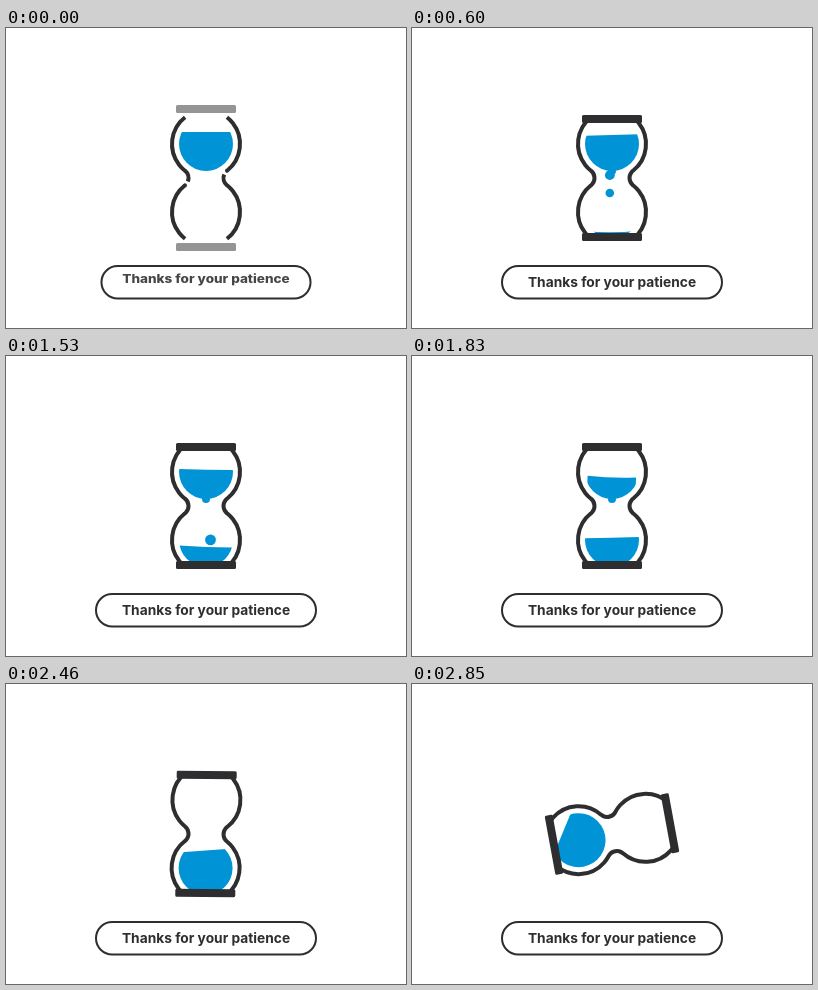
An HTML page with a canvas for the animation above (2.88 s loop, 400 by 300 pixels).

```html
<!DOCTYPE html>
<html lang="en">
<head>
<meta charset="utf-8">
<title>Hourglass</title>
<style>
html, body { margin: 0; width: 100%; height: 100%; overflow: hidden; background: #fff; }
canvas { display: block; width: 400px; height: 300px; }
</style>
</head>
<body>
<canvas id="stage"></canvas>
<script>
const LOOP = 2880, DARK = '#2e2d2f', BLUE = '#0094d6', RAD = Math.PI / 180;
const DROP_TIMES = [368, 500, 798, 1214, 1878];
const canvas = document.getElementById('stage');
const ctx = canvas.getContext('2d');
const dpr = window.devicePixelRatio || 1;
canvas.width = 400 * dpr;
canvas.height = 300 * dpr;

const { sin, cos, PI } = Math;
const clamp = x => Math.max(0, Math.min(1, x));
const mix = (a, b, k) => a + (b - a) * k;

function disc(x, y, r) {
  ctx.beginPath();
  ctx.arc(x, y, r, 0, 7);
  ctx.fill();
}

// Fills a bulb below a tilted, slightly sagging surface; level is relative to its centre.
function liquid(y, level, tilt, dip, w = 30) {
  if (level > 27) return;
  ctx.save();
  ctx.translate(0, y);
  ctx.beginPath();
  ctx.arc(0, 0, 27, 0, 7);
  ctx.clip();
  ctx.rotate(tilt * RAD);
  ctx.beginPath();
  ctx.moveTo(-w, level - dip);
  ctx.quadraticCurveTo(0, level + dip, w, level - dip);
  ctx.lineTo(w, 40);
  ctx.lineTo(-w, 40);
  ctx.fill();
  ctx.restore();
}

// The top bulb drains slowly, then in a rush.
function topLiquid(t) {
  const p = clamp(t / 2200), rush = p ** 8;
  const tilt = -4 * (1 - p ** 4) * sin(PI * Math.max(0, t - 470) / 950);
  liquid(-34, -12 + 11 * p + 36 * rush, tilt, 4 * rush, 30 - 25 * rush);
}

function lowLiquid(t, turn) {
  const p = Math.min(1, (t - 300) / 1800);
  const slosh = turn + Math.max(0, turn - 12) * 0.94;
  const tilt = 4 * p * sin(2.5 * PI * (p - 0.4)) - slosh;
  liquid(34, 24 - 22 * p - 19.5 * p ** 6, tilt, 2 * (1 - p));
}

function drip(t) {
  if (t > 200 && t < 2000) disc(0, -7, 4 * clamp((t - 200) / 150));
  DROP_TIMES.forEach((birth, i) => {
    const age = t - birth, y = -7 + 65 * (age / 400) ** 2;
    if (age < 0 || y > 54) return;
    const x = 4.5 * cos(1.4 * (i - 3)), r = 6.5 - 1.1 * Math.abs(i - 2);
    disc(x * clamp(age / 200), y, r * clamp(0.5 + age / 250));
  });
}

// One wall of the glass; the other is the same turned by half a circle.
function wall(gap) {
  ctx.beginPath();
  ctx.arc(0, -34, 34, 232 * RAD, 128.2 * RAD, true);
  ctx.arc(-26.8, 0, 9.3, -51.8 * RAD, 51.8 * RAD);
  ctx.arc(0, 34, 34, -128.2 * RAD, -232 * RAD, true);
  ctx.setLineDash(gap > 0.05 ? [75.3 - gap, 2 * gap, 200] : []);
  ctx.stroke();
}

function glass(t, k) {
  const turn = 79 * Math.max(0, (t - 2290) / 560) ** 4;
  ctx.save();
  ctx.translate(200, 150);
  ctx.rotate(turn * RAD);

  ctx.fillStyle = BLUE;
  topLiquid(t);
  lowLiquid(t, turn);
  drip(t);

  ctx.strokeStyle = ctx.fillStyle = DARK;
  ctx.lineWidth = 4;
  ctx.lineJoin = 'round';
  for (let side = 0; side < 2; side++) {
    wall(2 * (1 - k));
    ctx.globalAlpha = mix(0.5, 1, k);
    ctx.beginPath();
    ctx.roundRect(-30, -mix(73, 63, k), 60, 8, 1.5);
    ctx.fill();
    ctx.globalAlpha = 1;
    ctx.rotate(PI);
  }
  ctx.restore();
}

function label(k) {
  const half = mix(104.5, 110, k);
  ctx.strokeStyle = ctx.fillStyle = DARK;
  ctx.lineWidth = 2;
  ctx.beginPath();
  ctx.roundRect(200 - half, 238, 2 * half, 32.5, 16.25);
  ctx.stroke();

  ctx.save();
  ctx.translate(200, mix(255, 258.7, k));
  ctx.scale(1, mix(0.86, 1, k));
  ctx.globalAlpha = mix(0.88, 1, k);
  ctx.font = `${k < 0.5 ? 800 : 700} ${mix(13.5, 13.75, k)}px Inter, sans-serif`;
  ctx.textAlign = 'center';
  ctx.fillText('Thanks for your patience', 0, 0);
  ctx.restore();
}

function draw() {
  const t = performance.now() % LOOP;
  const k = 1 - (1 - clamp(t / 520)) ** 3;
  ctx.setTransform(dpr, 0, 0, dpr, 0, 0);
  ctx.fillStyle = '#fff';
  ctx.fillRect(0, 0, 400, 300);
  glass(t, k);
  label(k);
  requestAnimationFrame(draw);
}
draw();
</script>
</body>
</html>
```
